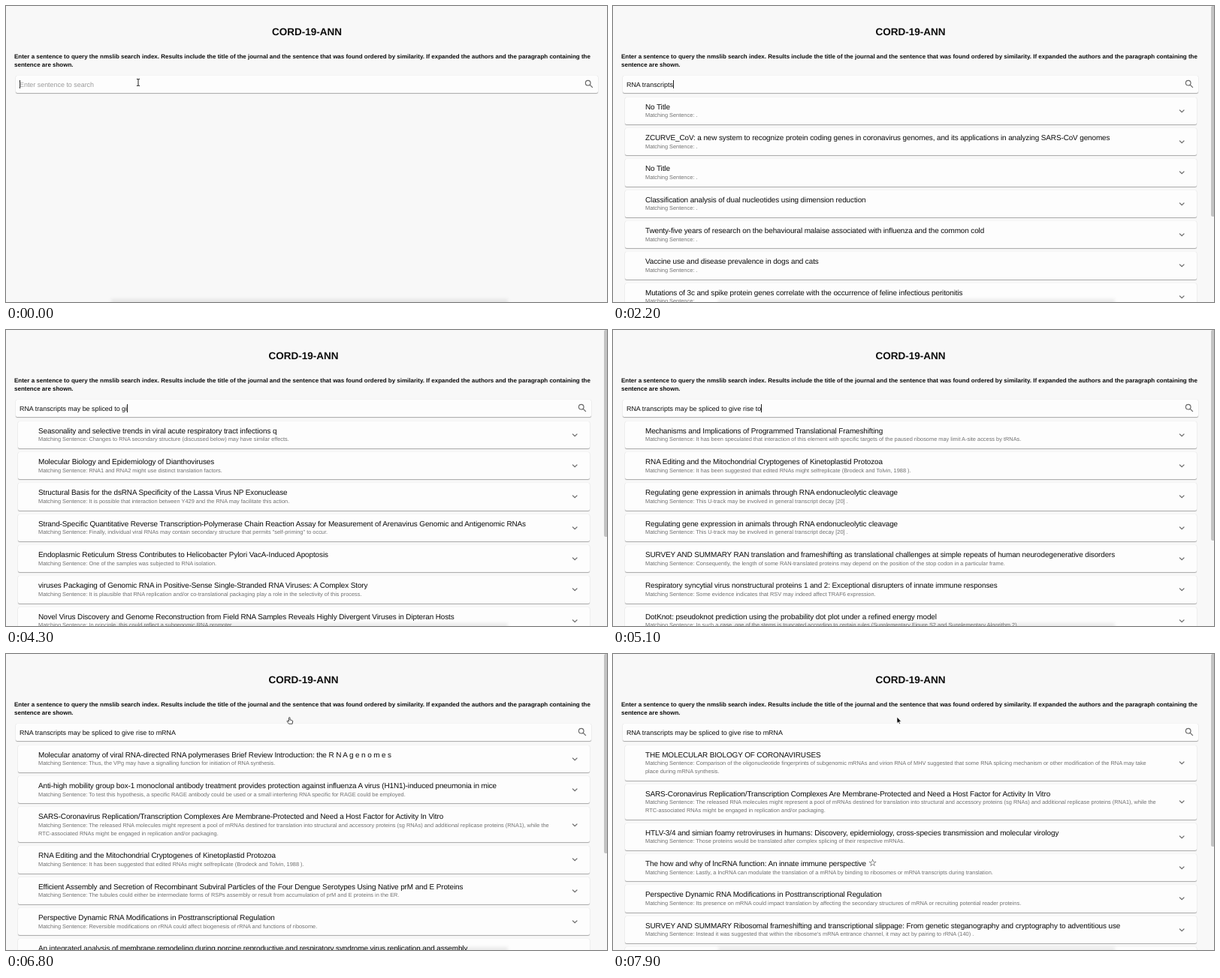
Recreate the animation shown at these times as an HTML page. Size 800 by 395 pixels, loop 8000 ms.

```html
<!DOCTYPE html>
<html lang="en">
<head>
<meta charset="utf-8">
<title>CORD-19-ANN</title>
<style>
html, body { margin: 0; width: 100%; height: 100%; overflow: hidden; background: #f8f8f8; }
body { position: relative; font-family: "Liberation Sans", Arial, sans-serif; color: #0c0c0c;
  white-space: pre; text-rendering: geometricPrecision; }
#page { position: absolute; left: 0; top: 0; width: 801px; height: 395px; }
#page.narrow { width: 792px; }
h1 { position: absolute; top: 25px; width: 100%; margin: 0; text-align: center; font: bold 13.5px/20px "Liberation Sans", Arial, sans-serif; }
p { position: absolute; left: 11px; top: 62px; margin: 0; font-size: 7.99px; line-height: 11px; font-weight: bold; }
.paper { background: #fdfdfd; border-radius: 2px;
  box-shadow: 0 1px 1px rgba(0,0,0,.32), 0 0 1px rgba(0,0,0,.14); }
#bar { position: absolute; left: 13px; right: 13px; top: 93px; height: 23px; padding-left: 5px;
  box-sizing: border-box; display: flex; align-items: center; font-size: 8.92px; }
#caret { width: 1px; height: 11px; margin-right: -1px; background: #222; }
#hint { color: #999; }
#bar svg { position: absolute; right: 5px; top: 3.8px; }
#list { position: absolute; left: 16px; top: 121.8px; width: 761px; }
.card { position: relative; padding: 8px 0 6.4px 27px; margin-bottom: 5px; }
.card b { display: block; font-weight: normal; font-size: 9.95px; letter-spacing: -.11px; line-height: 11.2px; }
.card big { font-size: 13px; line-height: 0; }
.card span { display: block; position: relative; top: .4px; font-size: 7.4px; line-height: 10.7px; color: #707070; }
.card svg { position: absolute; right: 13.1px; top: 50%; margin-top: -7.2px; }
svg { fill: none; stroke: #666; stroke-width: 2; }
#thumb { position: absolute; left: 796px; top: 0; width: 6px; border-radius: 2px; background: #c3c3c3; }
#glow { position: absolute; left: 140px; top: 391px; width: 528px; height: 10px; background: rgba(0,0,0,.07); filter: blur(2px); }
#mouse { position: absolute; left: 0; top: 0; stroke-width: 1; overflow: visible; }
</style>
</head>
<body>
<div id="page">
<h1>CORD-19-ANN</h1>
<p>Enter a sentence to query the nmslib search index. Results include the title of the journal and the sentence that was found ordered by similarity. If expanded the authors and the paragraph containing the
sentence are shown.</p>
<div id="bar" class="paper"><span id="typed"></span><i id="caret"></i><span id="hint">Enter sentence to search</span><svg width="14.4" height="14.4" viewBox="0 0 24 24"><circle cx="9.5" cy="9.5" r="5.5"/><path d="M14 14l5.8 5.8"/></svg></div>
<div id="list"></div>
</div>
<div id="thumb"></div>
<div id="glow"></div>
<svg id="mouse" width="1" height="1">
<path id="beam" stroke="#222" d="M-2-4.5h1.5l.5.7.5-.7H2M0-4V4M-2 4.5h1.5l.5-.7.5.7H2"/>
<path id="hand" stroke="#333" stroke-width=".9" fill="#fff" d="M-1.5 1V-3.500q0-1 .8-1t.8 1V-1l2.600.5q1 .3 1 1.400l-.6 3.300H-1.500L-3.700 1.300q-.6-1.200.6-1.200z"/>
<path id="arrow" stroke="#fff" stroke-width=".7" fill="#000" d="M0-5V3.500l1.900-1.700L3.100 4.600l1.300-.6L3.200 1.300h2.500z"/>
</svg>
<script>
const $ = id => document.getElementById(id);
const LOOP = 8000;
const QUERY = 'RNA transcripts may be spliced to give rise to mRNA';

// Bursts of typing: first key, last key, number of keys
const bursts = [[400, 600, 3], [900, 1100, 3], [1400, 2900, 16], [3100, 4300, 14],
  [4390, 5100, 10], [5200, 5200, 1], [5400, 6000, 4]];
const keys = bursts.flatMap(([a, b, n]) =>
  Array.from({ length: n }, (_, i) => a + (n > 1 ? (b - a) * i / (n - 1) : 0)));

// One result per line: title | matching sentence, with // for a line break
const parse = text => text.trim().split('\n').map(row => row.split('|').map(s => s.replaceAll(' // ', '\n')));

const early = parse(`
No Title|.
ZCURVE_CoV: a new system to recognize protein coding genes in coronavirus genomes, and its applications in analyzing SARS-CoV genomes|.
No Title|.
Classification analysis of dual nucleotides using dimension reduction|.
Twenty-five years of research on the behavioural malaise associated with influenza and the common cold|.
Vaccine use and disease prevalence in dogs and cats|.
Mutations of 3c and spike protein genes correlate with the occurrence of feline infectious peritonitis|.`);

const samples = parse(`
Growth and Quantification of MERS-CoV Infection|RNA sample.
octa-repeat domain of the mammalian prion protein mRNA forms stable A-helical hairpin structure rather than G-quadruplexes opeN|RNA preparation.
Unique Signatures of Long Noncoding RNA Expression in Response to Virus Infection and Altered Innate Immune Signaling|RNA preparation.
Cytokeratin 8/18 overexpression and complex formation as an indicator of GST-P positive foci transformation into hepatocellular carcinomas|RNA preparation.
Identification of the Spinal Cord as a Major Site of Persistence during Chronic Infection with a Murine Coronavirus|RNA analysis.
Coronaviruses SD and SK Share Extensive Nucleotide Homology with Murine Coronavirus MHV-A59, more than That Shared between Human and Murine // Coronaviruses|RNA analysis.
In Situ Tagged nsp15 Reveals Interactions with Coronavirus Replication/Transcription Complex- Associated Proteins|RNA analysis.`);

const structure = parse(`
Seasonality and selective trends in viral acute respiratory tract infections q|Changes to RNA secondary structure (discussed below) may have similar effects.
Molecular Biology and Epidemiology of Dianthoviruses|RNA1 and RNA2 might use distinct translation factors.
Structural Basis for the dsRNA Specificity of the Lassa Virus NP Exonuclease|It is possible that interaction between Y429 and the RNA may facilitate this action.
Strand-Specific Quantitative Reverse Transcription-Polymerase Chain Reaction Assay for Measurement of Arenavirus Genomic and Antigenomic RNAs|Finally, individual viral RNAs may contain secondary structure that permits "self-priming" to occur.
Endoplasmic Reticulum Stress Contributes to Helicobacter Pylori VacA-Induced Apoptosis|One of the samples was subjected to RNA isolation.
viruses Packaging of Genomic RNA in Positive-Sense Single-Stranded RNA Viruses: A Complex Story|It is plausible that RNA replication and/or co-translational packaging play a role in the selectivity of this process.
Novel Virus Discovery and Genome Reconstruction from Field RNA Samples Reveals Highly Divergent Viruses in Dipteran Hosts|In principle, this could reflect a subgenomic RNA promoter.`);

const editing = 'RNA Editing and the Mitochondrial Cryptogenes of Kinetoplastid Protozoa|It has been suggested that edited RNAs might selfreplicate (Brodeck and Tolvin, 1988 ).';
const cleavage = 'Regulating gene expression in animals through RNA endonucleolytic cleavage|This U-track may be involved in general transcript decay [20] .';
const complexes = 'SARS-Coronavirus Replication/Transcription Complexes Are Membrane-Protected and Need a Host Factor for Activity In Vitro|The released RNA molecules might represent a pool of mRNAs destined for translation into structural and accessory proteins (sg RNAs) and additional replicase proteins (RNA1), while the // RTC-associated RNAs might be engaged in replication and/or packaging.';

const shifting = parse(`
Mechanisms and Implications of Programmed Translational Frameshifting|It has been speculated that interaction of this element with specific targets of the paused ribosome may limit A-site access by tRNAs.
${editing}
${cleavage}
${cleavage}
SURVEY AND SUMMARY RAN translation and frameshifting as translational challenges at simple repeats of human neurodegenerative disorders|Consequently, the length of some RAN-translated proteins may depend on the position of the stop codon in a particular frame.
Respiratory syncytial virus nonstructural proteins 1 and 2: Exceptional disrupters of innate immune responses|Some evidence indicates that RSV may indeed affect TRAF6 expression.
DotKnot: pseudoknot prediction using the probability dot plot under a refined energy model|In such a case, one of the stems is truncated according to certain rules (Supplementary Figure S2 and Supplementary Algorithm 2).`);

const synthesis = parse(`
Molecular anatomy of viral RNA-directed RNA polymerases Brief Review Introduction: the R N A g e n o m e s|Thus, the VPg may have a signalling function for initiation of RNA synthesis.
Anti-high mobility group box-1 monoclonal antibody treatment provides protection against influenza A virus (H1N1)-induced pneumonia in mice|To test this hypothesis, a specific RAGE antibody could be used or a small interfering RNA specific for RAGE could be employed.
${complexes}
${editing}
Efficient Assembly and Secretion of Recombinant Subviral Particles of the Four Dengue Serotypes Using Native prM and E Proteins|The tubules could either be intermediate forms of RSPs assembly or result from accumulation of prM and E proteins in the ER.
Perspective Dynamic RNA Modifications in Posttranscriptional Regulation|Reversible modifications on rRNA could affect biogenesis of rRNA and functions of ribosome.
An integrated analysis of membrane remodeling during porcine reproductive and respiratory syndrome virus replication and assembly|.`);

const splicing = parse(`
THE MOLECULAR BIOLOGY OF CORONAVIRUSES|Comparison of the oligonucleotide fingerprints of subgenomic mRNAs and virion RNA of MHV suggested that some RNA splicing mechanism or other modification of the RNA may take // place during mRNA synthesis.
${complexes}
HTLV-3/4 and simian foamy retroviruses in humans: Discovery, epidemiology, cross-species transmission and molecular virology|Those proteins would be translated after complex splicing of their respective mRNAs.
The how and why of lncRNA function: An innate immune perspective <big>☆</big>|Lastly, a lncRNA can modulate the translation of a mRNA by binding to ribosomes or mRNA transcripts during translation.
Perspective Dynamic RNA Modifications in Posttranscriptional Regulation|Its presence on mRNA could impact translation by affecting the secondary structures of mRNA or recruiting potential reader proteins.
SURVEY AND SUMMARY Ribosomal frameshifting and transcriptional slippage: From genetic steganography and cryptography to adventitious use|Instead it was suggested that within the ribosome's mRNA entrance channel, it may act by pairing to rRNA (140) .
No Title|.`);

// Start time, scroll thumb height, rows
const results = [
  [0, 0, []],
  [1300, 281, early],
  [2400, 277, samples],
  [3700, 276, structure],
  [4700, 281, shifting],
  [6200, 266, synthesis],
  [7200, 262, [...splicing.slice(0, 2), ...synthesis.slice(3)]],
  [7900, 257, splicing],
];

const chevron = '<svg width="14.4" height="14.4" viewBox="0 0 24 24"><path d="M6.7 9.3L12 14.6l5.3-5.3"/></svg>';
const card = ([title, match]) =>
  `<div class="card paper"><b>${title}</b><span>Matching Sentence: ${match}</span>${chevron}</div>`;

let shown;
function showResults(t) {
  const set = results.findLast(r => r[0] <= t);
  if (set === shown) return;
  shown = set;
  $('page').className = set[1] ? 'narrow' : '';
  $('thumb').style.height = set[1] + 'px';
  $('list').innerHTML = set[2].map(card).join('');
}

function showTyping(t) {
  const count = keys.filter(k => k <= t + .01).length;
  const lastKey = count ? keys[count - 1] : -300;
  $('typed').textContent = QUERY.slice(0, count);
  $('hint').style.display = count ? 'none' : '';
  $('caret').style.opacity = (t - lastKey) % 1000 < 500 ? 1 : 0;
}

function showMouse(t) {
  const pose = t < 400 ? 'beam' : t < 6500 ? '' : t < 6900 ? 'hand' : 'arrow';
  for (const id of ['beam', 'hand', 'arrow']) $(id).style.display = id === pose ? '' : 'none';
  const p = Math.min(1, Math.max(0, (t - 6500) / 250));
  const e = p * (2 - p);
  const [x, y] = t < 400 ? [176, 102] : [330 + 48 * e, 124 - 35 * e];
  $('mouse').style.transform = `translate(${x}px, ${y}px)`;
}

const start = performance.now();
function tick() {
  const t = (performance.now() - start) % LOOP;
  showResults(t);
  showTyping(t);
  showMouse(t);
  requestAnimationFrame(tick);
}
tick();
</script>
</body>
</html>
```
